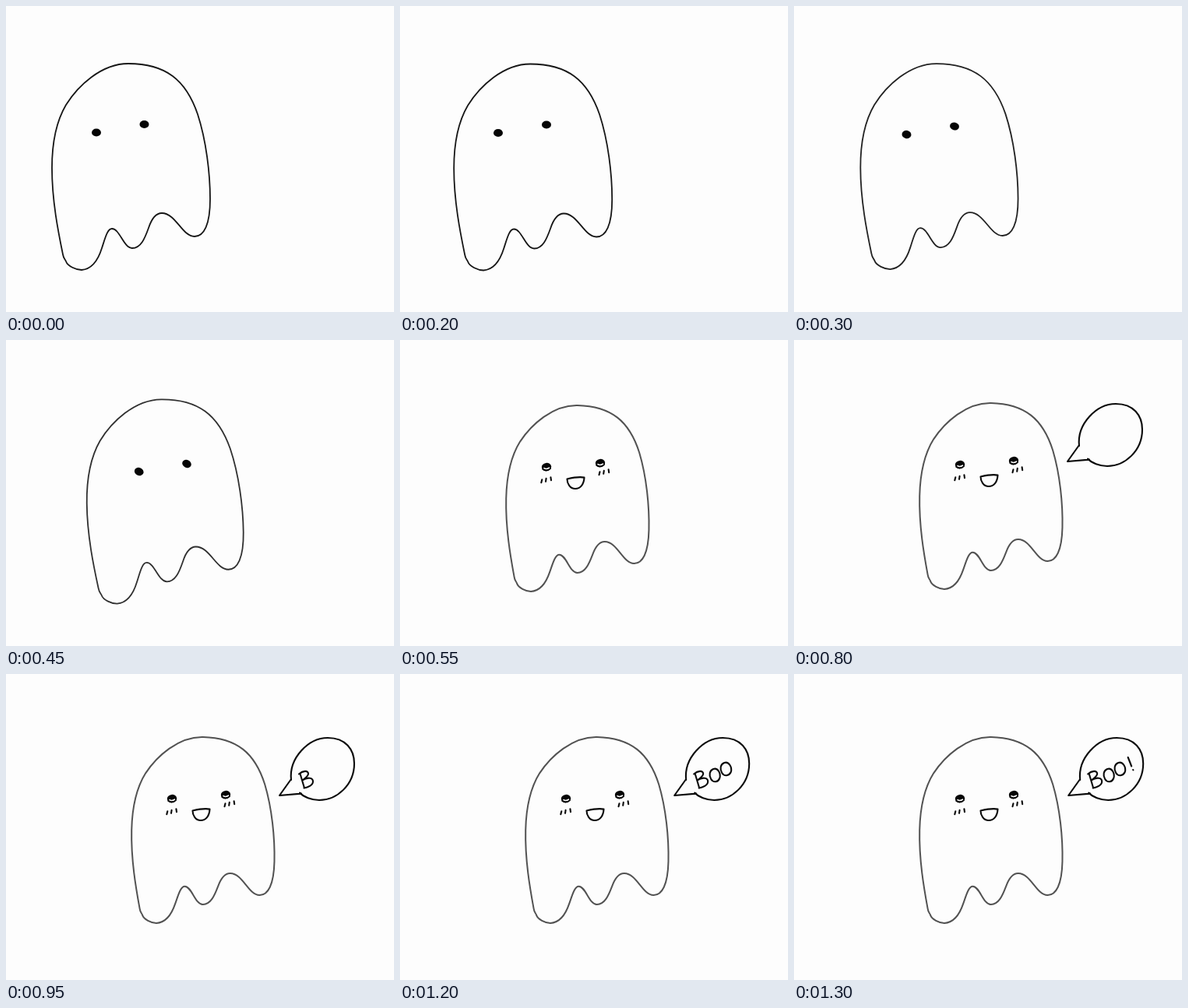
Write an HTML page that moves like this. It is 498 px wide and 393 px high and loops after 1.45 s.

```html
<!DOCTYPE html>
<html lang="en">
<head>
<meta charset="utf-8">
<title>Boo</title>
<style>
  html, body { margin: 0; width: 100%; height: 100%; overflow: hidden; background: #fdfdfd; }
  svg { display: block; width: 100vw; height: 100vh; }
  path { fill: none; stroke-linecap: round; stroke-linejoin: round; }
  .ink { stroke: #0a0a0a; stroke-width: 2.1; }
</style>
</head>
<body>
<svg viewBox="0 0 498 393">
  <defs>
    <g id="eye">
      <ellipse rx="6.2" ry="5.1" fill="#050505" transform="rotate(-8)"/>
      <path d="M-3 1.6Q0 3.6 3.4 1.2" stroke="#fdfdfd" stroke-width="1.7"/>
      <path d="M-5 3Q0 7 5.3 2" stroke="#050505" stroke-width="1.6"/>
    </g>
    <path id="blush" class="ink" d="M1.3 3L.3 7M6.6 1.6L6 5.6M12.4 0L13 4"/>
  </defs>

  <path id="ghost" vector-effect="non-scaling-stroke" d="M157 74C122 74 92 103 77 127
    C64 149 59 178 59 208C59 250 67 290 73 319C74 325 76 325 77 328
    C79 334 90 339 97 339C110 338 118 327 123 311C127 299 130 286 136 286
    C146 286 151 311 162 311C173 311 178 299 183 285C187 273 192 266 200 266
    C218 266 226 296 242 296C254 296 262 281 262 248
    C262 215 257 173 246 139C231 95 205 74 157 74Z"/>

  <g id="dots" fill="#050505">
    <ellipse rx="6" ry="5.1"/>
    <ellipse rx="6" ry="4.9"/>
  </g>

  <g id="face">
    <use href="#eye" x="213" y="160"/>
    <use href="#eye" x="282" y="155"/>
    <use href="#blush" x="206" y="173.2"/>
    <use href="#blush" x="280.2" y="163.2"/>
    <path class="ink" d="M239.5 175.5C246 174 256 172.5 261.5 173.6C261 183 256 188 250 188C243 188 239.5 181 239.5 175.5Z"/>
  </g>

  <g id="bubble" role="img" aria-label="BOO!">
    <path class="ink" d="M366 135L351 156L379 153.6M366 136C363 108 388 82 413 82
      C436 82 447 97 447 115C447 142 425 162 402 162C392 162 382 158 377 152.5"/>
    <g id="letters">
      <path class="ink" d="M377.5 128L383 146.5M376 128.5C381 124 388 123.5 388 128C388 131 384 134 380.5 136.5C387 132 394 133 394 138C394 143 387 146 382.5 146.5"/>
      <path class="ink" d="M401 122C396 124 395 130 398 135C401 140 407 139 409 134C411 128 407 120 401 122Z"/>
      <path class="ink" d="M415 114C410 116 409 122 412 127C415 132 421 131 423.5 126C425.5 120 421 112 415 114Z"/>
      <path class="ink" d="M427.5 107L432 118.5M434 123L434.2 123.4"/>
    </g>
  </g>
</svg>
<script>
const LOOP = 1450;
const el = id => document.getElementById(id);
const ghost = el('ghost'), dots = el('dots'), face = el('face'), bubble = el('bubble');
const letters = [...el('letters').children];

// at: ms, body: x, y, turn, scale, ink: grey level, dots: left eye, right eye, tilt
const rest = { body: [112, 10.6, 1.3, .907], ink: 82, face: [0, 0] };
const steps = [
  { at: 0, body: [0, 0, 0, 1], ink: 22, dots: [116, 162.5, 177.5, 152, 0] },
  { at: 200, body: [10.2, .5, 0, 1], ink: 22, dots: [126, 163, 188, 152.5, 0] },
  { at: 300, body: [26.2, .6, -.1, .996], ink: 34, dots: [144.5, 165, 206, 154.5, 15] },
  { at: 450, body: [43.3, 4.8, -.6, .988], ink: 48, dots: [170.7, 169, 232, 159, 25] },
  { at: 550, body: [87, 13.6, 1.3, .907], ink: 82, face: [-25, 3] },
  { at: 700, ...rest },
  { at: 800, ...rest, bubble: 0, typed: 0 },
  { at: 950, ...rest, bubble: 0, typed: 1 },
  { at: 1050, ...rest, bubble: .8, typed: 2 },
  { at: 1200, ...rest, bubble: 1.2, typed: 3 },
  { at: 1300, ...rest, bubble: 1.2, typed: 4 }
];

const show = (node, on) => node.setAttribute('display', on ? 'inline' : 'none');
const move = (node, value) => node.setAttribute('transform', value);

function draw(s) {
  const [x, y, turn, scale] = s.body;
  move(ghost, `translate(${x} ${y}) rotate(${turn}) scale(${scale})`);
  ghost.setAttribute('stroke', `rgb(${s.ink},${s.ink},${s.ink})`);
  ghost.setAttribute('stroke-width', s.ink > 60 ? 2 : 1.8);

  show(dots, s.dots);
  if (s.dots) {
    const [lx, ly, rx, ry, tilt] = s.dots;
    move(dots.children[0], `translate(${lx} ${ly}) rotate(${tilt})`);
    move(dots.children[1], `translate(${rx} ${ry}) rotate(${tilt})`);
  }

  show(face, s.face);
  if (s.face) move(face, `translate(${s.face})`);

  const talking = s.bubble !== undefined;
  show(bubble, talking);
  if (talking) {
    move(bubble, `translate(${s.bubble} 0)`);
    letters.forEach((letter, i) => show(letter, i < s.typed));
  }
}

let current;
const start = performance.now();
function tick() {
  const t = (performance.now() - start) % LOOP;
  const step = steps.findLast(s => s.at <= t) || steps[0];
  if (step !== current) draw(current = step);
  requestAnimationFrame(tick);
}
tick();
</script>
</body>
</html>
```
